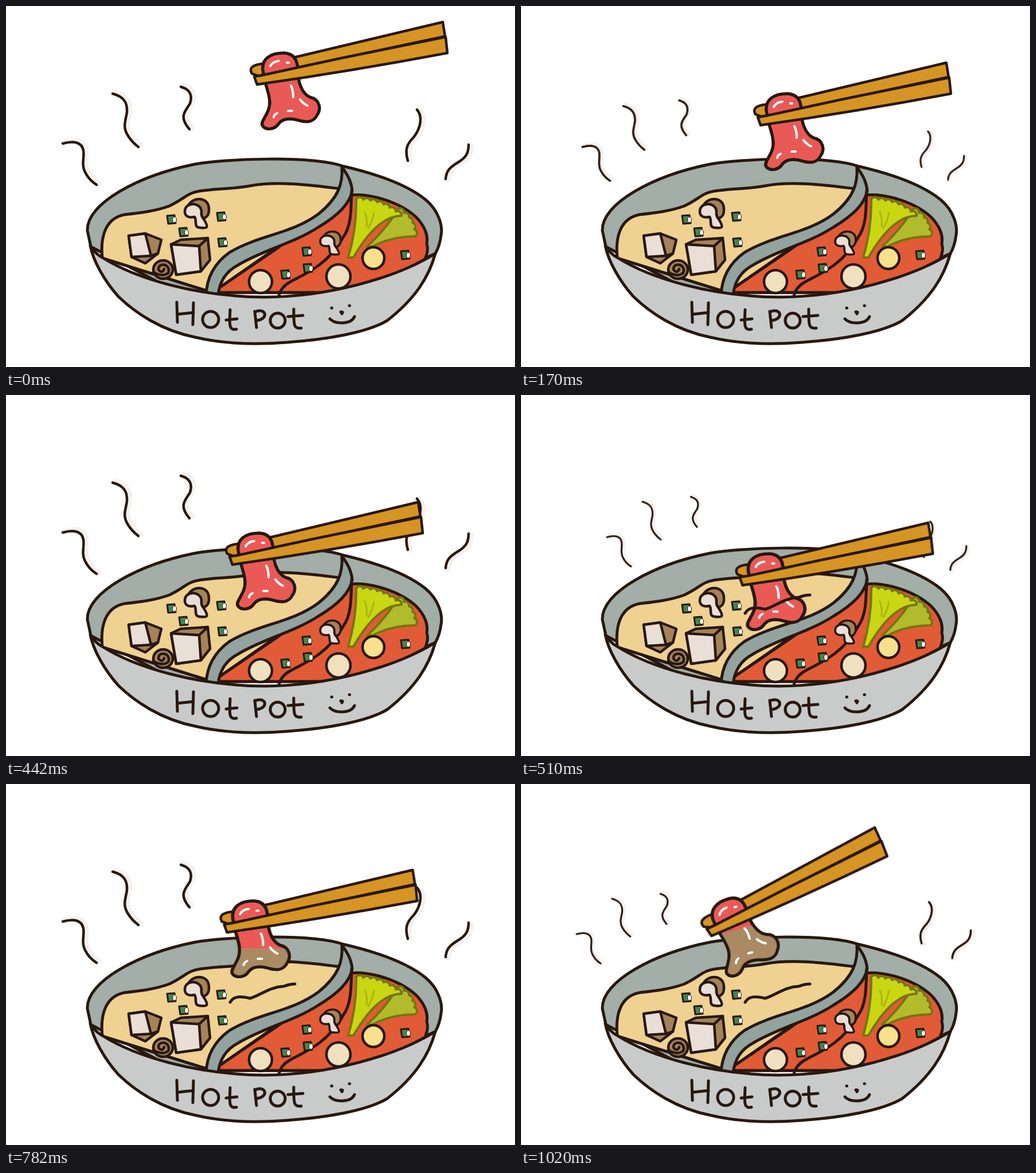
Recreate the animation shown at these times as an HTML page. Size 888 by 630 pixels, loop 1190 ms.

```html
<!DOCTYPE html>
<html lang="en">
<head>
<meta charset="utf-8">
<title>Hot Pot</title>
<style>
  html, body { margin: 0; width: 100%; height: 100%; overflow: hidden; background: #fff; }
  svg { display: block; width: 100vw; height: 100vh; }
  svg * { stroke-linecap: round; stroke-linejoin: round; }
  svg { stroke: #28180f; stroke-width: 5; }
  .line { fill: none; }
  .wood { fill: #d69424; stroke-width: 4.5; }
  .shine { fill: none; stroke: #fff; stroke-width: 4; }
  .tan { fill: #a58359; }
  .pale { fill: #e9dfd6; }
  .veg { stroke-width: 4.5; }
  .leaf { stroke: #77740f; stroke-width: 4; }
  .wisps { fill: none; stroke-width: 4.5; }
  .mist { stroke: #f6f1ef; stroke-width: 8; }

  .move { animation: 1190ms step-end infinite; }
  #dip { animation-name: dip; }
  #steamL { animation-name: steamL; }
  #steamR { animation-name: steamR; }
  #cooked { animation-name: cook; }
  #ripple { animation-name: ripple; }
  #stir { animation-name: stir; }

  @keyframes dip {
    0% { transform: none; }
    14.285% { transform: translate(-20px, 71px); }
    28.571% { transform: translate(-43px, 159px); }
    42.857% { transform: translate(-51.5px, 195px); }
    57.142% { transform: translate(-52.5px, 122px); }
    71.428% { transform: translate(597px, 147px) rotate(-30.5deg) translate(-766px, -55px); }
    85.714%, 100% { transform: translate(628px, 101px) rotate(-15deg) translate(-766px, -55px); }
  }
  @keyframes steamL {
    0%, 28.571%, 57.142% { transform: none; }
    14.285% { transform: translate(25.8px, 49.2px) scale(.82); }
    42.857% { transform: translate(79.7px, 77.6px) scale(.71); }
    71.428%, 100% { transform: translate(26.7px, 91.6px) scale(.71); }
  }
  @keyframes steamR {
    0%, 28.571%, 57.142% { transform: none; }
    14.285% { transform: translate(208px, 92px) scale(.7); }
    42.857% { transform: translate(212px, 94px) scale(.7); }
    71.428%, 100% { transform: translate(131px, 59.4px) scale(.81); }
  }
  @keyframes cook {
    0% { transform: translateY(100px); }
    57.142% { transform: translateY(27px); }
    71.428%, 100% { transform: none; }
  }
  @keyframes ripple {
    0%, 71.428% { opacity: 0; }
    42.857%, 85.714%, 100% { opacity: 1; }
  }
  @keyframes stir { 0%, 85.714%, 100% { opacity: 0; } 71.428% { opacity: 1; } }
</style>
</head>
<body>
<svg viewBox="0 0 888 630" role="img" aria-label="Hot Pot">
  <defs>
    <g id="onion">
      <path fill="#3f8a4b" stroke-width="3" d="M-8-7 5-8 7 6-6 7Z"/>
      <ellipse cx="5" rx="3.6" ry="5" fill="#f4f4ee" stroke-width="1"/>
    </g>
    <g id="mushroom">
      <path class="tan" d="M316 356C318 332 354 330 354 354C355 368 345 374 337 368Z"/>
      <path class="pale" d="M312 360C311 340 342 342 341 360Q340 366 345 372C355 388 350 388 340 387C326 387 334 375 329 368C320 370 313 368 312 360Z"/>
    </g>
    <path id="meat" d="M448 112C446 93 460 82 485 82C503 83 509 95 509 112C509 130 515 152 530 159C548 163 550 180 543 190C536 204 524 203 512 200C497 195 483 196 476 205C468 217 452 217 447 208C444 200 461 186 460 168C460 155 455 145 452 132Z"/>
    <clipPath id="meatClip"><use href="#meat"/></clipPath>
    <path id="left" d="M99 240C118 235 132 237 135 252C137 264 131 277 138 290Q145 304 158 312M186 153C205 158 212 168 211 185C209 200 203 210 212 225Q219 237 231 246M305 141C320 145 326 155 321 170C314 183 300 192 320 215"/>
    <path id="right" d="M717 181C727 192 724 212 712 228C700 240 695 250 701 270M807 242C807 256 803 264 790 272C775 281 768 287 767 302"/>
  </defs>

  <g class="wisps move" id="steamL">
    <use href="#left" class="mist" x="5" y="-3"/><use href="#left"/>
  </g>
  <g class="wisps move" id="steamR">
    <use href="#right" class="mist" x="5" y="2"/><use href="#right"/>
  </g>

  <!-- inside of the pot -->
  <path fill="#a2aea7" d="M142 392C140 345 230 296 330 276C380 267 530 260 590 280C650 294 700 312 732 338C756 358 762 385 759 400Q757 418 749 432L600 500H300L148 420Z"/>
  <path fill="#efd192" d="M168 440C164 400 175 370 207 364C235 361 260 358 285 349C315 335 315 325 345 322C375 318 400 319 425 314C470 305 530 312 583 319L590 340 360 500Z"/>
  <path fill="#e25b37" d="M600 330C640 326 690 345 715 368C730 383 737 400 734 415Q738 425 731 442L620 500H360L470 425Z"/>
  <path fill="#93a39f" d="M586 281C588 310 580 335 545 363C500 397 440 400 390 430C362 450 350 475 349 505H370C372 485 380 465 405 452C450 425 500 415 545 386C580 365 600 345 604 322C602 305 596 295 586 281Z"/>
  <path class="line" d="M603 322C602 360 602 385 588 404C560 455 515 470 495 482Q480 490 476 506"/>
  <path class="line move" id="stir" d="M328 394Q345 389 370 385L413 344Q440 348 454 336"/>

  <g id="dip" class="move">
    <path class="wood" d="M429 118Q421 104 446 101L510 88 762 28 766 53 440 122Z"/>
    <use href="#meat" fill="#e95a56"/>
    <g clip-path="url(#meatClip)">
      <path id="cooked" class="move" fill="#aa8a62" stroke="none" d="M430 138H570V240H430Z"/>
    </g>
    <use href="#meat" fill="none"/>
    <path class="shine" d="M461 105Q465 97 476 96M490 99h3M497 139Q501 146 501 159M513 163Q519 171 526 174M492 183h7M467 194Q468 189 473 187"/>
    <path class="wood" d="M433 123 446 121 580 92 767 54 770 82Q600 114 438 137Z"/>
  </g>
  <path id="ripple" class="line move" d="M391 381C397 370 408 370 426 374C445 368 460 354 485 353Q495 349 504 349"/>

  <g class="veg">
    <path class="tan" d="M214 401 243 397 271 408 265 432 243 449 219 438Z"/>
    <path class="pale" d="M214 401 243 397 253 436 219 438ZM253 436 265 432"/>
    <path class="tan" d="M288 416 305 408 352 405 356 443 340 463 297 469Z"/>
    <path class="pale" d="M288 416 337 419 340 463 297 469ZM337 419 352 405"/>
    <ellipse class="tan" cx="274" cy="460" rx="17" ry="16"/>
    <path class="line" d="M257 464Q272 474 283 466C289 450 265 446 266 460Q272 468 276 459"/>
    <use href="#mushroom"/>
    <use href="#mushroom" transform="translate(283 124) scale(.85 .8)"/>
    <use href="#onion" x="289" y="373"/>
    <use href="#onion" x="310" y="395"/>
    <use href="#onion" x="376" y="368"/>
    <use href="#onion" x="378" y="413"/>
    <use href="#onion" x="525" y="429"/>
    <use href="#onion" x="488" y="469"/>
    <use href="#onion" x="527" y="458"/>
    <use href="#onion" x="697" y="435"/>
    <path class="leaf" id="back" fill="#b2bb2b"/>
    <path class="leaf" id="front" fill="#c9d612"/>
    <path class="line" stroke="#a9b512" stroke-width="3" d="M626 360Q631 372 629 385M642 361Q639 376 632 388"/>
    <circle cx="444" cy="481" r="20" fill="#efe1bf"/>
    <circle cx="580" cy="472" r="21" fill="#efe1bf"/>
    <circle cx="641" cy="440" r="19" fill="#f8e08c"/>
  </g>

  <!-- front of the pot -->
  <path fill="#c9cbca" d="M147 418Q155 432 168 439C225 475 330 507 450 508C560 508 680 475 749 432C738 472 715 510 665 549C630 570 560 582 490 587C440 591 380 590 330 578C270 566 225 535 196 507C172 480 152 445 147 418Z"/>

  <g class="line">
    <path d="M298 517 299 552M327 518 326 556M299 538 327 535"/>
    <circle cx="357" cy="547" r="14"/>
    <path d="M391 530C390 555 388 567 402 564M384 548 403 546"/>
    <path d="M434 533 437 561M434 534C453 525 460 546 437 549"/>
    <circle cx="474" cy="549" r="13"/>
    <path d="M502 529C502 555 501 564 515 562M492 542 518 540"/>
    <path d="M568 527h.5M599 523h.5M584 534Q589 533 586 537M565 546C575 556 602 556 608 542"/>
  </g>
</svg>
<script>
  // A fan-shaped leaf: frilled edge bowed from a to b, tapering to its root.
  function leaf(id, root, a, b, bow, frills) {
    const dx = b[0] - a[0], dy = b[1] - a[1], len = Math.hypot(dx, dy);
    let d = `M${root}Q${(root[0] + a[0]) / 2 + 8} ${(root[1] + a[1]) / 2} ${a}`;
    for (let i = 1; i <= frills; i++) {
      const t = i / frills, out = bow * Math.sin(Math.PI * t) / len;
      d += `A7 7 0 0 1 ${a[0] + dx * t + dy * out} ${a[1] + dy * t - dx * out}`;
    }
    d += `Q${b[0] - 42} ${b[1]} ${root[0] + 9} ${root[1]}Z`;
    document.getElementById(id).setAttribute('d', d);
  }
  leaf('back', [630, 420], [684, 354], [714, 402], 9, 5);
  leaf('front', [597, 439], [611, 337], [690, 366], 8, 7);
</script>
</body>
</html>
```
